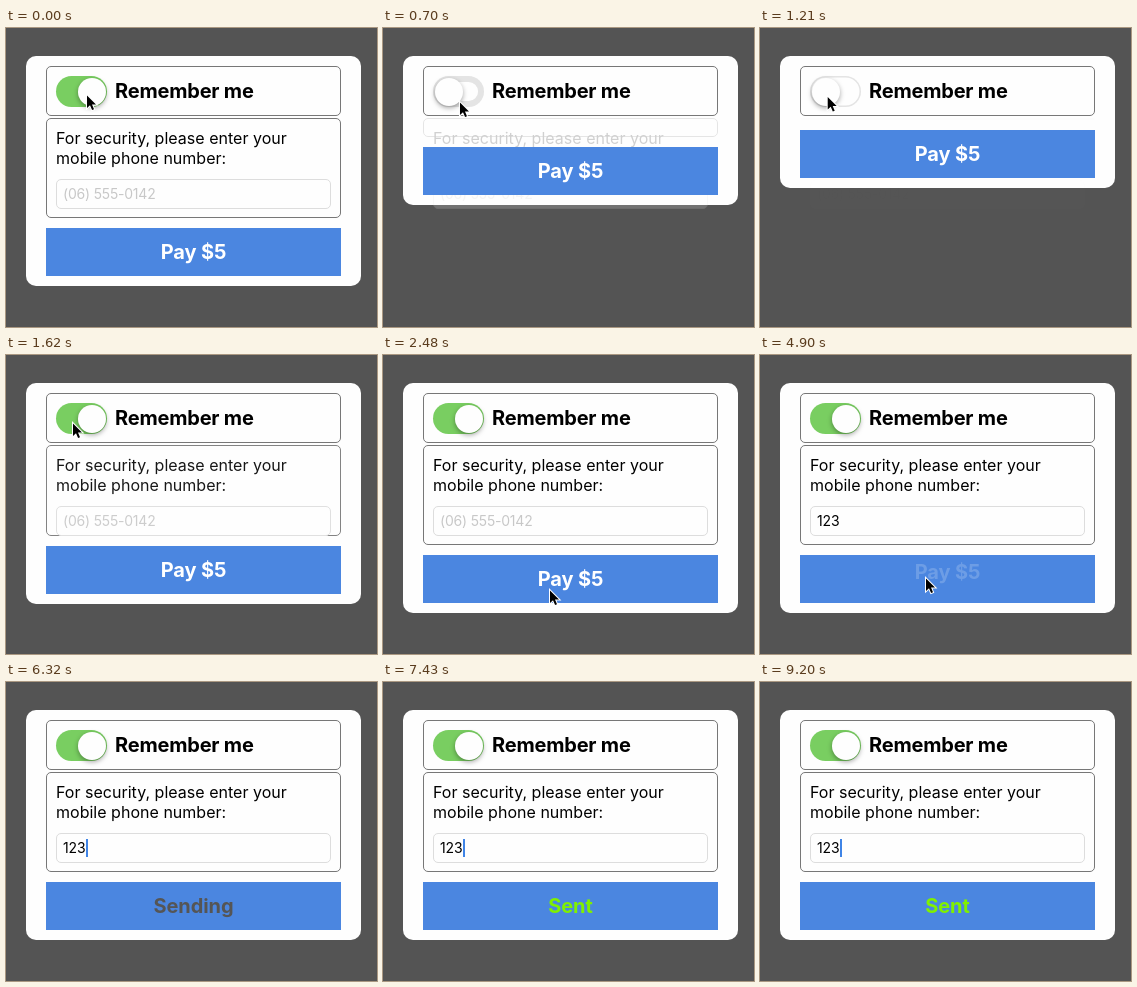
These frames come from a looping animation (371 px wide and 299 px high, 9300 ms). An HTML page:

```html
<!DOCTYPE html>
<html lang="en">
<head>
<meta charset="utf-8">
<title>Payment form</title>
<style>
  * { box-sizing: border-box; }
  html, body { margin: 0; width: 371px; height: 299px; overflow: hidden; }
  body { position: relative; background: #545454; font: 16px/20px Inter, "Open Sans", sans-serif; color: #000; }
  div, svg { position: absolute; }
  div { white-space: nowrap; }
  #card { left: 20px; top: 28px; width: 335px; border-radius: 10px; background: #fefefe; }
  .panel { left: 20px; width: 295px; border: 1px solid #777; border-radius: 5px; }
  #remember { top: 10px; height: 50px; }
  #phone { top: 62px; }
  #toggle { left: 9px; top: 9px; width: 51px; height: 31px; border-radius: 16px; background: #fefefe; }
  #knob { left: 1.5px; top: 1.5px; width: 28px; height: 28px; border-radius: 50%; background: #fefefe; box-shadow: 0 2px 5px rgba(0, 0, 0, .35); }
  .bold { font-weight: 700; font-size: 20px; line-height: 24px; letter-spacing: -.2px; }
  #title { left: 68px; top: 12px; }
  #ask { left: 9px; top: 9px; letter-spacing: .02px; }
  #field { left: 9px; top: 60px; width: 275px; height: 30px; border: 1px solid #ddd; border-radius: 5px; background: #fefefe; }
  #value { left: 6px; top: 4px; font-size: 14px; }
  #caret { top: 5px; width: 2px; height: 18px; background: #3f84e6; }
  #pay { left: 20px; width: 295px; height: 48px; background: #4b86e0; }
  #pay div { left: 0; top: 12px; width: 100%; text-align: center; letter-spacing: -.1px; }
  #mouse { left: 0; top: 0; overflow: visible; }
</style>
</head>
<body>
<div id="card">
  <div id="remember" class="panel">
    <div id="toggle"><div id="knob"></div></div>
    <div id="title" class="bold">Remember me</div>
  </div>
  <div id="phone" class="panel">
    <div id="ask">For security, please enter your<br>mobile phone number:</div>
    <div id="field"><div id="value"></div><div id="caret"></div></div>
  </div>
  <div id="pay"><div id="label" class="bold"></div></div>
</div>
<svg id="mouse" width="12" height="18">
  <path d="M1 1.5V14L4 11.2 6.1 16 8 15.2 6 10.5H10Z" fill="#000" stroke="#fff" stroke-width="2" paint-order="stroke"/>
</svg>
<script>
const LOOP = 9300;
const $ = id => document.getElementById(id);
const [card, phone, toggle, knob, value, caret, pay, label, mouse] =
  ['card', 'phone', 'toggle', 'knob', 'value', 'caret', 'pay', 'label', 'mouse'].map($);

const TOGGLE_OFF = 517, TOGGLE_ON = 1411;
const SHAKE = { start: 2533, length: 820, x: [0, -1, 2, -4, 4, -4, 4, -4, 2, -1, 0] };
const LABELS = [
  { text: 'Pay $5', color: '#fff', end: 4720 },
  { text: 'Sending', color: '#555', end: 6840 },
  { text: 'Sent', color: '#80f000', end: Infinity }
];
const EXIT = 250, ENTER = 320;

// time, x, y
const MOUSE = [
  [0, 80, 66], [109, 80, 66], [110, 79, 67], [400, 79, 67], [520, 76, 73], [700, 76, 73],
  [1250, 66, 67], [1700, 66, 67], [2300, 166, 234], [4400, 166, 234], [4640, 165, 222]
];
// time, opacity
const CARET = [
  [0, 0], [3650, 0], [3660, 1], [4690, 1], [4720, 0], [5180, 0], [5310, 1], [5730, 1], [5900, 0],
  [6190, 0], [6320, 1], [6740, 1], [6910, 0], [7180, 0], [7320, 1], [7720, 1], [7850, 0],
  [8140, 0], [8270, 1], [8680, 1], [8850, 0], [9120, 0], [9200, 1]
];

const clamp = v => Math.max(0, Math.min(1, v));
const smooth = p => p * p * (3 - 2 * p);
const easeOut = p => 1 - (1 - p) ** 2;
const mix = (a, b, p) => a + (b - a) * p;

function track(keys, t, col = 1) {
  const i = keys.findIndex(k => k[0] > t);
  if (i < 0) return keys[keys.length - 1][col];
  const a = keys[i - 1], b = keys[i];
  return mix(a[col], b[col], (t - a[0]) / (b[0] - a[0]));
}

function spring(ms) {
  if (ms <= 0) return 0;
  const damp = .69, w = 12.5, s = ms / 1000;
  const root = Math.sqrt(1 - damp * damp), a = w * root * s;
  return 1 - Math.exp(-damp * w * s) * (Math.cos(a) + damp / root * Math.sin(a));
}

function bezier(x1, y1, x2, y2) {
  const at = (a, b, u) => 3 * a * u * (1 - u) ** 2 + 3 * b * u * u * (1 - u) + u ** 3;
  return x => {
    let lo = 0, hi = 1;
    for (let i = 0; i < 20; i++) {
      const mid = (lo + hi) / 2;
      if (at(x1, x2, mid) < x) lo = mid; else hi = mid;
    }
    return at(y1, y2, lo);
  };
}
const shakeEase = bezier(.36, .07, .19, .97);

function shakeX(t) {
  const p = (t - SHAKE.start) / SHAKE.length * 10;
  if (p <= 0 || p >= 10) return 0;
  const i = Math.floor(p);
  return mix(SHAKE.x[i], SHAKE.x[i + 1], shakeEase(p - i));
}

function drawPanel(t) {
  const open = t < TOGGLE_ON ? 1 - spring(t - TOGGLE_OFF) : spring(t - TOGGLE_ON);
  const height = 2 + 98 * Math.max(0, open);
  phone.style.height = height + 'px';
  phone.style.opacity = clamp(open);
  pay.style.top = 72 + height + 'px';
  card.style.height = 130 + height + 'px';
  card.style.transform = `translateX(${shakeX(t)}px)`;
}

function drawToggle(t) {
  const state = ms => t < TOGGLE_ON
    ? 1 - easeOut(clamp((t - TOGGLE_OFF) / ms))
    : easeOut(clamp((t - TOGGLE_ON) / ms));
  const tint = state(180), ring = mix(1.5, 20, state(360));
  const rgb = [[228, 121], [228, 206], [228, 97]].map(c => mix(...c, tint));
  toggle.style.boxShadow = `inset 0 0 0 ${ring}px rgb(${rgb})`;
  knob.style.transform = `translateX(${20 * state(180)}px)`;
}

function drawField(t) {
  const typed = t < 4020 ? '' : t < 4190 ? '12' : '123';
  value.textContent = typed || '(06) 555-0142';
  value.style.color = typed ? '#000' : '#c8c8c8';
  value.style.letterSpacing = typed ? '-.1px' : '-.2px';
  caret.style.left = [6, 0, 21, 29][typed.length] + 'px';
  caret.style.opacity = track(CARET, t);
}

function drawLabel(t) {
  const i = LABELS.findIndex(l => t < l.end + EXIT), { text, color, end } = LABELS[i];
  const enter = i ? easeOut(clamp((t - LABELS[i - 1].end - EXIT) / ENTER)) : 1;
  const exit = smooth(clamp((t - end) / EXIT));
  label.textContent = text;
  label.style.color = color;
  label.style.opacity = enter * (1 - exit);
  label.style.transform = `translateY(${12 * (1 - enter) - 8 * exit}px)`;
}

function drawMouse(t) {
  const shown = t < 3350 || (t >= 4400 && t < 5110);
  mouse.style.visibility = shown ? 'visible' : 'hidden';
  mouse.style.transform = `translate(${track(MOUSE, t, 1)}px, ${track(MOUSE, t, 2)}px)`;
}

const start = performance.now();
function frame() {
  const t = (performance.now() - start) % LOOP;
  for (const draw of [drawPanel, drawToggle, drawField, drawLabel, drawMouse]) draw(t);
  requestAnimationFrame(frame);
}
frame();
</script>
</body>
</html>
```
